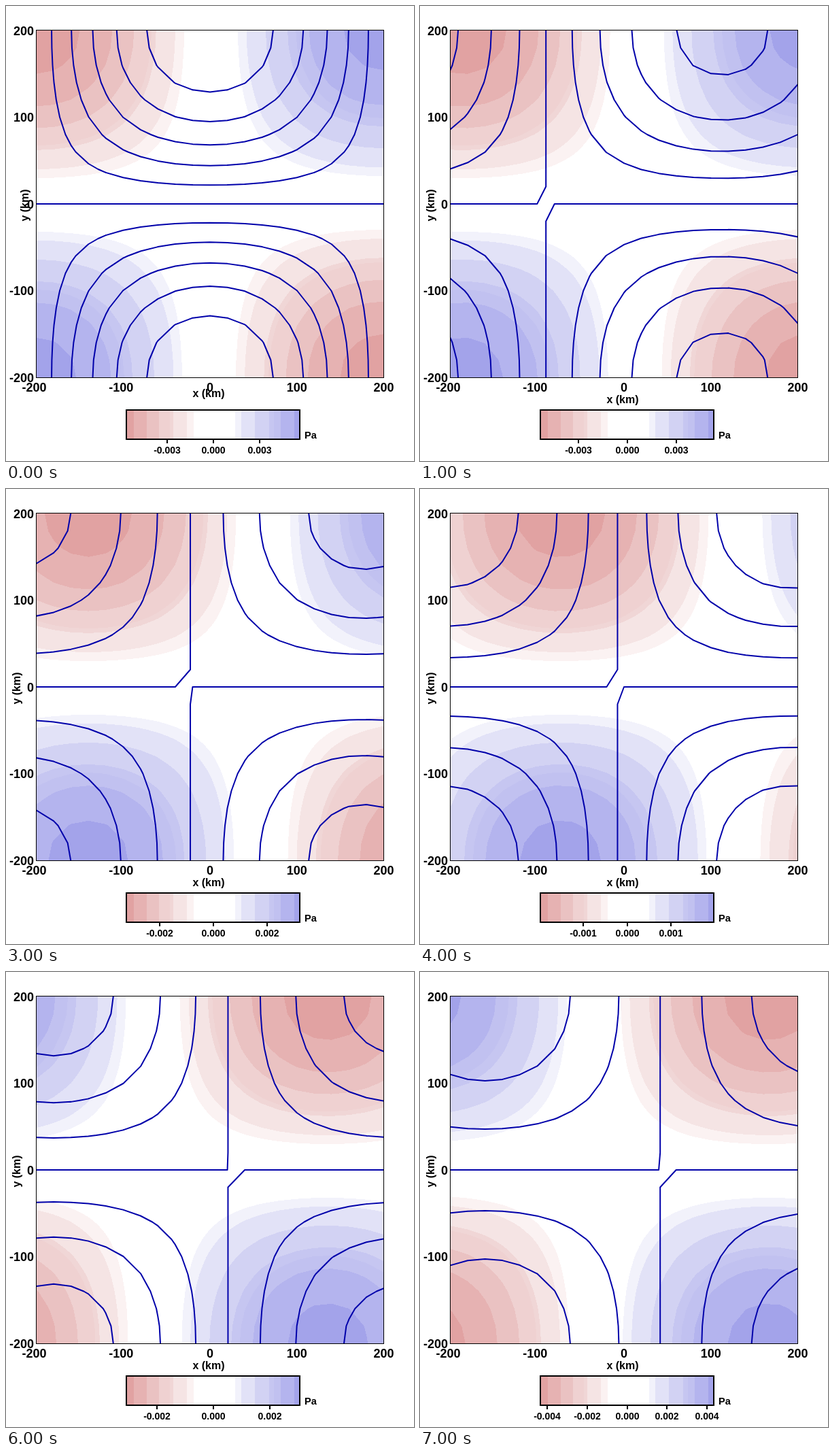
An HTML page with a canvas that plays this animation: 600x669 px, repeating every 8 s.

```html
<!DOCTYPE html>
<html>
<head>
<meta charset="utf-8">
<style>
  html, body { margin: 0; width: 100%; height: 100%; overflow: hidden; background: #fff; }
  canvas { display: block; }
</style>
</head>
<body>
<canvas id="stage" width="600" height="669"></canvas>
<script>
const ctx = document.getElementById('stage').getContext('2d');
const LEFT = 45, TOP = 36, WIDTH = 510, HEIGHT = 510;
const CELLS = 20, SPACING = 20;                 // grid cells per side, km per cell
const OMEGA = 19.75 * Math.PI / 180;            // phase advance per step
const RATIO = 0.302, PRESSURE = 5.62;           // PRESSURE in 0.001 Pa
const LINE_UNIT = 0.0511;
// Each band: fraction of the maximum where it starts, strong channel, weak channels
const RED = [[.231, 251, 242], [.309, 245, 228], [.468, 240, 214], [.503, 239, 209],
             [.632, 234, 194], [.771, 230, 178], [.921, 225, 162]];
const BLUE = [[.249, 251, 242], [.324, 247, 226], [.482, 243, 210], [.643, 241, 198],
              [.70, 240, 193], [.778, 238, 180], [.934, 234, 163]];

const nodes = Array.from({ length: CELLS + 1 }, (_, i) => (i - CELLS / 2) * SPACING);
const sine = nodes.map(v => Math.sin(v * Math.PI / 400));
const cosine = nodes.map(v => Math.cos(v * Math.PI / 400));
const wideCosine = nodes.map(v => Math.cos(v * Math.PI / 409));
const peak = list => Math.max(...list.map(Math.abs));
const toX = x => 300 + x * 1.2775;
const toY = y => 291 - y * 1.275;

function bandColor(v) {
  let color = [255, 255, 255];
  for (const [start, strong, weak] of v < 0 ? RED : BLUE) {
    if (Math.abs(v) < start) break;
    color = v < 0 ? [strong, weak, weak] : [weak, weak, strong];
  }
  return color;
}

// Piecewise linear value between grid nodes, at a position in km
function sample(list, km) {
  const pos = Math.min(CELLS, Math.max(0, km / SPACING + CELLS / 2));
  const i = Math.min(CELLS - 1, Math.floor(pos));
  return list[i] + (list[i + 1] - list[i]) * (pos - i);
}

function drawField(profile) {
  const image = ctx.createImageData(WIDTH, HEIGHT);
  const max = peak(profile);
  const across = Array.from({ length: WIDTH }, (_, i) => sample(profile, (LEFT + i + .5 - 300) / 1.2775) / max);
  for (let j = 0, k = 0; j < HEIGHT; j++) {
    const down = sample(sine, (291 - TOP - j - .5) / 1.275);
    for (let i = 0; i < WIDTH; i++, k += 4) {
      image.data.set(bandColor(across[i] * down), k);
      image.data[k + 3] = 255;
    }
  }
  ctx.putImageData(image, LEFT, TOP);
}

// Marching squares for one level
function traceLevel(profile, level) {
  const value = (i, j) => profile[i] * sine[j] - level;
  for (let j = 0; j < CELLS; j++) {
    for (let i = 0; i < CELLS; i++) {
      const corners = [[i, j], [i + 1, j], [i + 1, j + 1], [i, j + 1]];
      const hits = [];
      corners.forEach((a, n) => {
        const b = corners[(n + 1) % 4], va = value(...a), vb = value(...b);
        if ((va >= 0) === (vb >= 0)) return;
        const f = va / (va - vb);
        hits.push([toX(nodes[a[0]] + (b[0] - a[0]) * f * SPACING),
                   toY(nodes[a[1]] + (b[1] - a[1]) * f * SPACING)]);
      });
      for (let n = 0; n + 1 < hits.length; n += 2) {
        ctx.moveTo(...hits[n]);
        ctx.lineTo(...hits[n + 1]);
      }
    }
  }
}

function drawContours(profile) {
  const units = peak(profile) / LINE_UNIT;
  const step = [1, 2, 5].find(s => units / s < 6);
  ctx.save();
  ctx.beginPath();
  ctx.rect(LEFT, TOP, WIDTH, HEIGHT);
  ctx.clip();
  ctx.beginPath();
  const count = Math.floor(units / step);
  for (let n = -count; n <= count; n++) traceLevel(profile, n * step * LINE_UNIT);
  ctx.strokeStyle = '#0000aa';
  ctx.lineWidth = 2;
  ctx.lineCap = 'round';
  ctx.stroke();
  ctx.restore();
}

function text(label, x, y, size, align = 'center') {
  ctx.font = `bold ${size}px "Liberation Sans", Arial, sans-serif`;
  ctx.textAlign = align;
  ctx.fillText(label, x, y);
}

function drawAxes(first) {
  ctx.strokeStyle = ctx.fillStyle = '#000';
  ctx.lineWidth = 1;
  ctx.strokeRect(44.5, 35.5, 511, 511);
  for (const v of [-200, -100, 0, 100, 200]) {
    text(v, v < 0 ? toX(v) - 3 : toX(v), 567, 18);
    text(v, 41, toY(v) + 6.5, 18, 'right');
  }
  text('x (km)', 298, first ? 575 : 584, 16);
  ctx.save();
  ctx.translate(first ? 33 : 21, 293);
  ctx.rotate(-Math.PI / 2);
  text('y (km)', 0, 0, 16);
  ctx.restore();
}

function drawColorBar(max) {
  for (let x = 178; x < 432; x++) {
    ctx.fillStyle = `rgb(${bandColor((x + .5 - 305) / 127)})`;
    ctx.fillRect(x, 595, 1, 42);
  }
  ctx.strokeStyle = ctx.fillStyle = '#000';
  ctx.lineWidth = 2;
  ctx.strokeRect(177, 594, 255, 43);
  const step = Math.round(max / 2), count = Math.floor(max / step);
  for (let n = -count; n <= count; n++) {
    const x = Math.round(304.7 + n * step / max * 127.5);
    ctx.fillRect(x - 1, 637, 2, 6);
    text((n * step / 1000).toFixed(3), x, 658, 14);
  }
  text('Pa', 439, 636, 14.5, 'left');
}

function draw(step) {
  const c = Math.cos(OMEGA * step), s = Math.sin(OMEGA * step);
  const pressure = nodes.map((_, i) => PRESSURE * (c * sine[i] - RATIO * s * cosine[i]));
  const height = nodes.map((_, i) => RATIO * c * wideCosine[i] + s * sine[i]);
  ctx.fillStyle = '#fff';
  ctx.fillRect(0, 0, 600, 669);
  drawField(pressure);
  drawContours(height);
  drawAxes(step === 0);
  drawColorBar(peak(pressure));
}

let shown = -1;
function tick() {
  const step = Math.floor(performance.now() % 8000 / 1000);
  if (step !== shown) draw(shown = step);
  requestAnimationFrame(tick);
}
tick();
</script>
</body>
</html>
```
